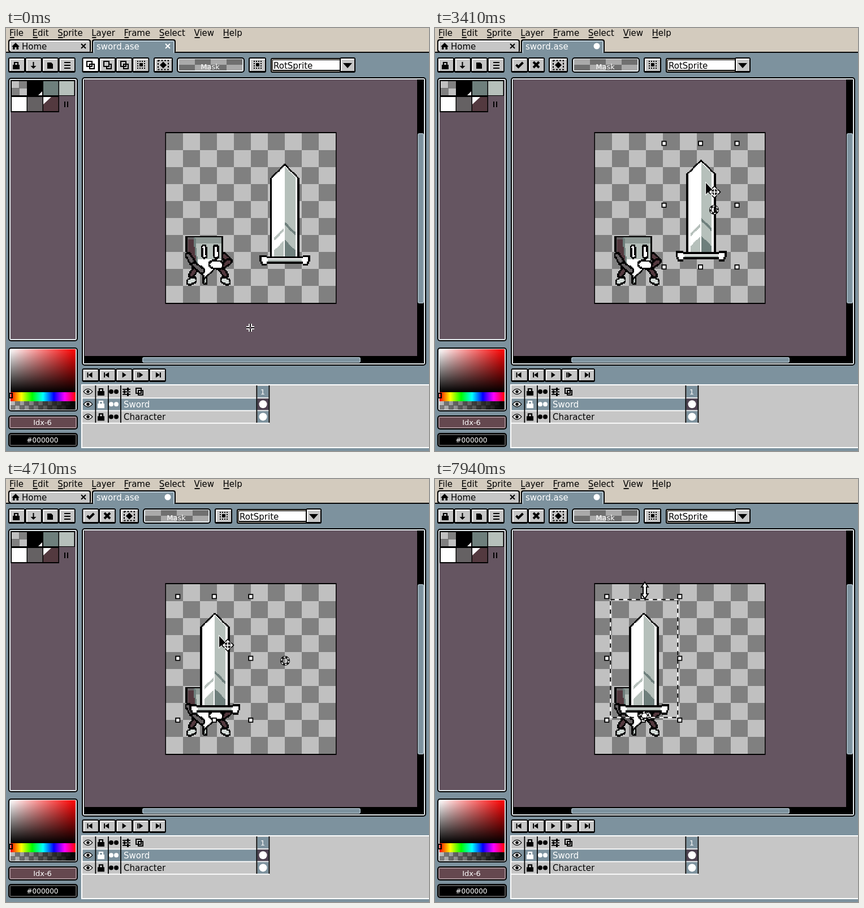
Animation of 748x748 px, one loop 7.99 s. Source, as an HTML page with a canvas:

```html
<!DOCTYPE html>
<html lang="en">
<head>
<meta charset="utf-8">
<title>Sprite editor</title>
<style>
html, body { margin: 0; height: 100%; overflow: hidden; }
canvas { display: block; }
</style>
</head>
<body>
<canvas id="stage" width="748" height="748"></canvas>
<script>
const ctx = document.getElementById('stage').getContext('2d');
const LOOP = 7990, U = 1.875, GRID = 16 * U, LEFT = 283, TOP = 186;
const BLUE = '#7d929e', PURPLE = '#655561', GRAY = '#c6c6c6', BEIGE = '#d3cbbe', LIGHT = '#e4ebee';
const STEEL = '#b6c0bb', SLATE = '#6e7f7c', MAROON = '#53393f', SMOKE = '#656163';

// ---------- drawing helpers ----------
function rect(color, x, y, w, h) {
  ctx.fillStyle = color;
  ctx.fillRect(x, y, w, h);
}
function panel(color, x, y, w, h, r = 4) {
  ctx.fillStyle = color;
  ctx.beginPath();
  ctx.roundRect(x, y, w, h, r);
  ctx.fill();
}
function text(str, x, y, color = '#000', size = 15, align = 'left') {
  ctx.font = size + 'px "DejaVu Sans", sans-serif';
  ctx.textAlign = align;
  ctx.fillStyle = color;
  ctx.fillText(str, x, y);
}
function path(d, x, y, fill, stroke, width = 2) {
  const p = new Path2D(d);
  ctx.save();
  ctx.translate(x, y);
  if (stroke) {
    ctx.strokeStyle = stroke;
    ctx.lineWidth = width;
    ctx.stroke(p);
  }
  if (fill) {
    ctx.fillStyle = fill;
    ctx.fill(p);
  }
  ctx.restore();
}
function disc(color, x, y, r) {
  panel(color, x - r, y - r, 2 * r, 2 * r, r);
}
function checker(x, y, cols, rows, w, h = w, first = '#808080', second = '#c0c0c0') {
  for (let r = 0; r < rows; r++)
    for (let c = 0; c < cols; c++) rect((r + c) % 2 ? second : first, x + c * w, y + r * h, w, h);
}
function framed(x, y, w, h, fill, edge = LIGHT) {
  panel('#000', x, y, w, h, 5);
  panel(edge, x + 2, y + 2, w - 4, h - 4, 3);
  rect(fill, x + 4, y + 4, w - 8, h - 8);
}
function button(x, y, w = 30, h = 27, fill = GRAY) {
  panel('#000', x, y, w, h, 3);
  rect('#fff', x + 2, y + 2, w - 4, h - 5);
  rect(fill, x + 4, y + 4, w - 6, h - 7);
}
function row(x, y, count, h, firstFill) {
  for (let i = 0; i < count; i++) button(x + i * 29.6, y, 30, h, i ? GRAY : firstFill);
}
function cross(x, y, color, r = 4, width = 2) {
  path(`M${-r} ${-r}L${r} ${r}M${r} ${-r}L${-r} ${r}`, x, y, null, color, width);
}
function dotGrid(x, y) {
  for (let i = 0; i < 16; i++) rect('#000', x - 7 + (i % 4) * 4, y - 7 + (i >> 2) * 4, 2, 2);
  rect('#000', x - 3, y - 3, 6, 6);
}
function padlock(x, y, color) {
  rect(color, x - 6, y - 1, 12, 8);
  path('M-3 0V-5H3V0', x, y, null, color, 2.2);
}

// ---------- pixel art: a rule gives the colour at each point ----------
function pixelArt(colorAt) {
  const art = document.createElement('canvas');
  art.width = art.height = 160;
  const g = art.getContext('2d');
  for (let j = 0; j < 160; j++)
    for (let i = 0; i < 160; i++) {
      const color = colorAt(LEFT + (i + .5) * U, TOP + (j + .5) * U);
      if (!color) continue;
      g.fillStyle = color;
      g.fillRect(i, j, 1, 1);
    }
  return art;
}
const sword = pixelArt((x, y) => {
  const right = x > 493, a = Math.abs(x - 493);

  // Guard: a bar with taller, chamfered ends.
  const knob = a > 31;
  const guard = Math.min(y - (knob ? 401 : 403), (knob ? 419.5 : 417) - y, 45 - a - Math.max(0, y - 410) * .45);
  if (guard > 0) return guard < 3.6 ? '#000' : y > 410 && a < 30 ? STEEL : '#fff';

  // Blade: an upright strip with a square point and slanted bands.
  const blade = Math.min(26 - a, y - 239.5 - a), slant = y - a;
  if (blade < 0 || y > 404) return null;
  if (blade < 3.7) return '#000';
  const band = slant > 374 ? 2 : slant > (right ? 343 : 352) && slant < (right ? 349 : 358) ? 1 : 0;
  if (right) return blade < 6.5 ? '#fff' : band ? SLATE : STEEL;
  return band && a > 2.5 && a < 19 ? STEEL : '#fff';
});

function distanceToLine(x, y, x1, y1, x2, y2) {
  const dx = x2 - x1, dy = y2 - y1;
  const s = Math.min(1, Math.max(0, ((x - x1) * dx + (y - y1) * dy) / (dx * dx + dy * dy)));
  return Math.hypot(x - x1 - s * dx, y - y1 - s * dy);
}
const character = pixelArt((x, y) => {
  let color = null;
  const limb = (fill, r, ...line) => {
    const d = distanceToLine(x, y, ...line);
    if (d < r) color = d < r - 3.2 ? fill : '#000';
  };
  for (const side of [-1, 1]) {
    limb(MAROON, 6, 358 + side * 23, 426, 358 + side * 30, 437);
    limb('#d5dcd9', 7, 358 + side * 27, 446, 358 + side * 33, 449);
  }
  limb(STEEL, 5, 352, 444, 352, 450);
  limb(MAROON, 6.5, 384, 402, 394, 412);
  limb(MAROON, 6, 394, 413, 383, 421);

  // Body: a box that narrows to a chin.
  const body = Math.min(y - 367, x - 316 - Math.max(0, (y - 394) * .68), 385 - x - Math.max(0, (y - 410) * .95), 446 - y);
  if (body > 0) {
    const side = x - 333 - (y - 372) * .12;
    color = body < 3.6 ? '#000'
      : side < -2 ? (body < 6.5 ? SMOKE : MAROON)
      : side < 1.5 ? SLATE
      : y < 381 ? '#8d9894' : y < 409 ? STEEL : '#fff';
  }
  for (const eye of [350, 371]) limb('#fff', 5.6, eye, 388, eye + 1, 403);
  limb(SMOKE, 6, 322, 402, 333, 419);
  limb(SMOKE, 6, 333, 419, 346, 429);
  limb('#fff', 8.5, 366, 418, 377, 419);
  return color;
});
const putArt = (art, dx = 0, dy = 0) => ctx.drawImage(art, LEFT + dx, TOP + dy, 160 * U, 160 * U);

// ---------- interface ----------
function menuAndTabs(moving) {
  rect(BLUE, 0, 0, 748, 748);
  rect(BEIGE, 0, 0, 748, 42);
  let x = 6;
  for (const label of ['File', 'Edit', 'Sprite', 'Layer', 'Frame', 'Select', 'View', 'Help']) {
    text(label, x, 13.5);
    rect('#000', x + 1, 16, ctx.measureText(label[0]).width - 1, 1.8);
    x += ctx.measureText(label).width + 15.5;
  }
  rect('#000', 0, 42, 748, 1.9);
  panel('#000', 4, 20, 146, 23);
  panel('#fff', 6, 22, 142, 19, 3);
  rect(GRAY, 8, 24, 140, 18);
  panel('#000', 152, 20, 148, 24);
  panel('#b9cbd6', 154, 22, 144, 23, 3);
  rect(BLUE, 156, 24, 140, 22);
  path('M-7 1L0 -6 7 1H5V6H1.5V2H-1.5V6H-5V1Z', 17, 32, '#000');
  text('Home', 28, 38);
  cross(137, 32, '#000');
  text('sword.ase', 160, 38, '#fff');
  if (moving) disc('#fff', 286, 32, 5.5);
  else cross(286, 32, '#fff');
}
function toolbar(moving) {
  row(4, 52, 4);
  padlock(18, 66, '#000');
  path('M-1 -6H1V1H5L0 6 -5 1H-1Z', 48.5, 66, '#000');
  path('M-5 -5H2L5 -2V6H-5Z', 78, 66, '#000');
  for (const y of [60, 65, 70]) rect('#000', 103, y, 11, 2);

  if (moving) {
    row(134.5, 52, 2);
    path('M-6 0L-2 4 6 -4', 149.5, 65, null, '#000', 4);
    cross(179, 65, '#000', 5, 4);
  } else {
    row(134.5, 52, 4, 27, '#fff');
    for (const x of [149, 179, 209]) path('M-6 -6H3V3H-6ZM-1 -1H7V7H-1Z', x, 65, null, '#000');
    rect(GRAY, 174, 60, 7, 7);
    dotGrid(239, 65);
  }
  ctx.save();
  ctx.translate(moving ? -60 : 0, 0);
  button(261, 52, 34);
  ctx.setLineDash([3, 2.5]);
  path('M-9 -8H9V8H-9Z', 278, 65.5, null, '#000');
  ctx.setLineDash([]);
  path('M-6 0L0 -6 6 0 0 6Z', 278, 65.5, '#000');
  framed(302, 52, 120, 27, GRAY);
  checker(306, 55, 4, 2, 28, 10, '#aaa', '#707070');
  text('Mask', 361, 72.5, '#fff', 13, 'center');
  button(429, 52, 31);
  dotGrid(445, 65);
  panel('#000', 468, 53, 125, 26, 3);
  rect(BEIGE, 470, 55, 121, 22);
  rect('#000', 471, 56, 119, 20);
  rect('#fff', 472, 57, 118, 17);
  text('RotSprite', 473, 71.5);
  button(590, 52, 28);
  path('M-8 -4H8L0 5Z', 604, 66, '#000');
  ctx.restore();
}
function gradient(x, y, colors) {
  const g = ctx.createLinearGradient(8, 568, x, y);
  colors.forEach((c, i) => g.addColorStop(i / (colors.length - 1), c));
  return g;
}
function colorBar() {
  framed(4, 88, 123, 466, PURPLE);
  rect('#000', 8, 92, 114, 28);
  rect('#000', 8, 120, 86, 29);
  [null, '#000', SLATE, STEEL, '#fff', SMOKE, MAROON].forEach((c, i) => {
    const x = 10 + (i % 4) * 28, y = i < 4 ? 94 : 122;
    if (c) rect(c, x, y, 26.5, 25);
    else checker(x, y, 2, 2, 13.5, 12.5, '#c0c0c0', '#808080');
  });
  path('M0 0V-7L-7 0Z', 64, 119, '#fff');
  path('M0 0H14L0 13Z', 66, 122, '#fff');
  for (const x of [103, 108]) rect('#000', x, 130, 2, 10);

  framed(4, 565, 123, 113, '#000');
  rect(gradient(123, 568, ['#fff', '#f00']), 8, 568, 115, 76);
  rect(gradient(8, 644, ['#0000', '#000']), 8, 568, 115, 76);
  rect(gradient(123, 568, ['#f00', '#ff0', '#0f0', '#0ff', '#00f', '#f0f', '#f00']), 8, 644, 115, 16);
  checker(8, 660, 14, 2, 8.2, 7.5, '#c0c0c0', '#808080');
  rect(gradient(123, 568, ['#0000', '#000']), 8, 660, 115, 15);
  path('M0 0H5V8H0Z', 6, 646, null, '#000');

  framed(4, 685, 123, 25, '#65484f', '#a58e94');
  text('Idx-6', 64.5, 702, '#fff', 13, 'center');
  framed(4, 716, 123, 25, '#000', '#555');
  text('#000000', 64.5, 733, '#fff', 12, 'center');
}
function timeline() {
  row(134.5, 602, 5, 24);
  for (let i = 0; i < 5; i++) {
    const x = 149.5 + i * 29.6, d = i < 2 ? -1 : 1, end = i % 4 === 0;
    path(`M${-3 * d} -5L${4 * d} 0 ${-3 * d} 5Z`, x, 613.5, '#000');
    if (i !== 2) rect('#000', x - 1 + (end ? 5 : -5) * d * (i === 1 ? -1 : 1) * (i === 3 ? 1 : 1), 609, 2, 9);
  }
  rect('#fff', 133, 630, 615, 113);
  rect(GRAY, 135, 632, 613, 109);
  rect(BLUE, 136, 655, 329, 21);
  [BLUE, '#4d4150', BLUE].forEach((fill, i) => {
    const y = 633 + i * 22.2, mid = y + 10, ink = i === 1 ? '#fff' : '#000';
    rect(fill, 444.5, y, 20, 20.5);
    rect('#fff', 135, y + 20.5, 331, 1.8);
    path('M-7 0Q0 -8 7 0Q0 8 -7 0Z', 145, mid, '#fff', '#000', 2.5);
    disc('#000', 145, mid, 2.8);
    padlock(168, mid, ink);
    for (const x of [186, 195]) disc(ink, x, mid, 4);
    if (i) {
      disc('#fff', 454.5, mid, 7);
      text(i === 1 ? 'Sword' : 'Character', 208, mid + 5.3, ink);
    }
  });
  for (const x of [157.5, 180, 202, 442.5, 464.5]) rect('#000', x, 632, 1.8, 66);
  for (let i = 0; i < 3; i++) {
    rect('#000', 206, 638 + i * 4.5, 14, 1.8);
    rect('#000', 214 - (i % 2) * 6, 636 + i * 4.5, 3, 6);
  }
  path('M-6 -6H3V3H-6ZM-2 -2H6V6H-2Z', 236, 643, null, '#000');
  text('1', 454, 648, '#fff', 13, 'center');
}
function editor() {
  framed(134, 87, 609, 510, '#000');
  rect(PURPLE, 139, 91, 588, 489);
  for (const [x, y, w, h] of [[728, 186, 11, 301], [241, 582, 386, 10]]) {
    panel('#a9bac4', x, y, w, h, 3);
    panel(BLUE, x + 1.5, y + 1.5, w - 3, h - 3, 2);
  }
  rect('#000', LEFT - 1.5, TOP - 2, 303, 304);
  checker(LEFT, TOP, 10, 10, GRID);
}

// ---------- selection and cursors ----------
function outline(x0, y0, x1, y1) {
  path(`M${x0 + .9} ${y0 + .9}H${x1 - .9}V${y1 - .9}H${x0 + .9}Z`, 0, 0, null, '#000', 1.8);
  // The line inverts where it crosses the dark edge of the tip.
  if (y0 === TOP + 2 * GRID) for (const x of [486, 495.5]) rect('#fff', x, y0, 4, 1.8);
}
function ants(x, y, phase) {
  const box = 'M1 1H120V209.5H1Z';
  ctx.save();
  path(box, x, y, null, '#fff', 1.9);
  ctx.setLineDash([4 * U, 4 * U]);
  ctx.lineDashOffset = -phase;
  path(box, x, y, null, '#000', 1.9);
  ctx.restore();
}
function handles(x, y) {
  for (let i = 0; i < 9; i++) {
    if (i === 4) continue;
    const hx = x - 5.5 + (i % 3) * 64.5, hy = y - 4.5 + Math.floor(i / 3) * 109.3;
    rect('#000', hx - 4.5, hy - 4.5, 9, 9);
    rect('#fff', hx - 2.6, hy - 2.6, 5.4, 5.4);
  }
}
function pivotMark(x, y) {
  const ring = 'M6.5 0A6.5 6.5 0 1 1 -6.5 0A6.5 6.5 0 1 1 6.5 0';
  ctx.save();
  path(ring, x, y, null, '#000', 4);
  ctx.setLineDash([3.4, 3.4]);
  path(ring, x, y, null, '#fff', 1.9);
  ctx.restore();
}
const cursors = {
  crosshair(x, y) {
    const arms = 'M-7 0H-2M2 0H7M0 -7V-2M0 2V7';
    path(arms, x, y, null, '#fff', 5.6);
    path(arms, x, y, null, '#000', 1.9);
  },
  move(x, y) {
    path('M0 0V20L5 15H14Z', x, y, '#000', '#fff', 2);
    const star = 'M-8 0H8M0 -8V8M-5 -3L-8 0L-5 3M5 -3L8 0L5 3M-3 -5L0 -8L3 -5M-3 5L0 8L3 5';
    path(star, x + 15, y + 16, null, '#000', 5);
    path(star, x + 15, y + 16, null, '#fff', 1.8);
  },
  hand(x, y) {
    path('M-3 0H6L9 4V11L6 17H-3L-7 9V5H-3Z', x, y, '#fff', '#000', 3.6);
    for (let i = 0; i < 3; i++) rect('#000', x - .5 + i * 3, y + 1, 1.4, 6);
  },
  resize(x, y) {
    path('M0 -13L4 -7H2V7H4L0 13L-4 7H-2V-7H-4Z', x, y, '#fff', '#000', 4);
  }
};

// ---------- motion ----------
const DRAW = 1930, SELECTED = 2820, GRAB = 3350, DROP = 4980, PIVOT_GRAB = 5780, PIVOT_DROP = 6560;
// Each pointer move: start time, end time, destination.
const moves = [
  [1120, 1890, 533, 417], [2070, 2630, 441, 224], [SELECTED, 3200, 501, 282],
  [GRAB, 3780, 418, 252], [3780, 4170, 387, 264], [4170, 4770, 377, 278],
  [DROP, 5400, 367, 312], [PIVOT_GRAB, 6290, 378, 412], [6290, PIVOT_DROP, 369, 413], [7120, 7940, 371, 197]
];
const clamp = (v, lo, hi) => Math.min(hi, Math.max(lo, v));

function pointer(t) {
  let x = 432, y = 530;
  for (const [from, to, toX, toY] of moves) {
    const s = clamp((t - from) / (to - from), 0, 1), eased = s * (2 - s);
    x += (toX - x) * eased;
    y += (toY - y) * eased;
  }
  return [x, y];
}
function dragged(t, from, to) {
  const [x0, y0] = pointer(from), [x, y] = pointer(clamp(t, from, to));
  return [x - x0, y - y0].map(v => Math.round(v / U) * U);
}
function cursorKind(t, y) {
  if (t < SELECTED) return 'crosshair';
  if (t < DROP) return 'move';
  if (t < PIVOT_GRAB) return y > 304 ? 'hand' : 'move';
  if (t < 6630) return 'move';
  return y > 404 ? 'hand' : y > 216 ? 'move' : 'resize';
}
function antPhase(t) {
  for (const [from, to] of [[3200, DROP], [5690, 7120]]) if (t > from && t < to) t = from;
  return Math.floor(t / 45) * U;
}
function render(t) {
  const moving = t >= GRAB, [px, py] = pointer(t), [dx, dy] = dragged(t, GRAB, DROP);
  ctx.imageSmoothingEnabled = false;
  menuAndTabs(moving);
  toolbar(moving);
  colorBar();
  editor();
  timeline();
  putArt(character);
  putArt(sword, dx, dy);

  if (t >= DRAW && t < SELECTED) {
    const snap = (v, origin) => origin + Math.floor((v - 7 - origin) / GRID) * GRID;
    outline(snap(px, LEFT), snap(py, TOP), LEFT + 9 * GRID, TOP + 8 * GRID);
  }
  if (t >= SELECTED) {
    const x = LEFT + 5 * GRID + dx, y = TOP + GRID + dy;
    const dragging = (t >= GRAB && t < DROP) || (t >= PIVOT_GRAB && t < PIVOT_DROP);
    if (!dragging) ants(x, y, antPhase(t));
    handles(x, y);
    const [qx, qy] = dragged(t, PIVOT_GRAB, PIVOT_DROP);
    if (t < DROP) pivotMark(493.5, 321.5);
    else pivotMark(368.5 + qx, 317.5 + qy);
  }
  cursors[cursorKind(t, py)](px, py);
}
function tick(now) {
  render(now % LOOP);
  requestAnimationFrame(tick);
}
requestAnimationFrame(tick);
</script>
</body>
</html>
```
